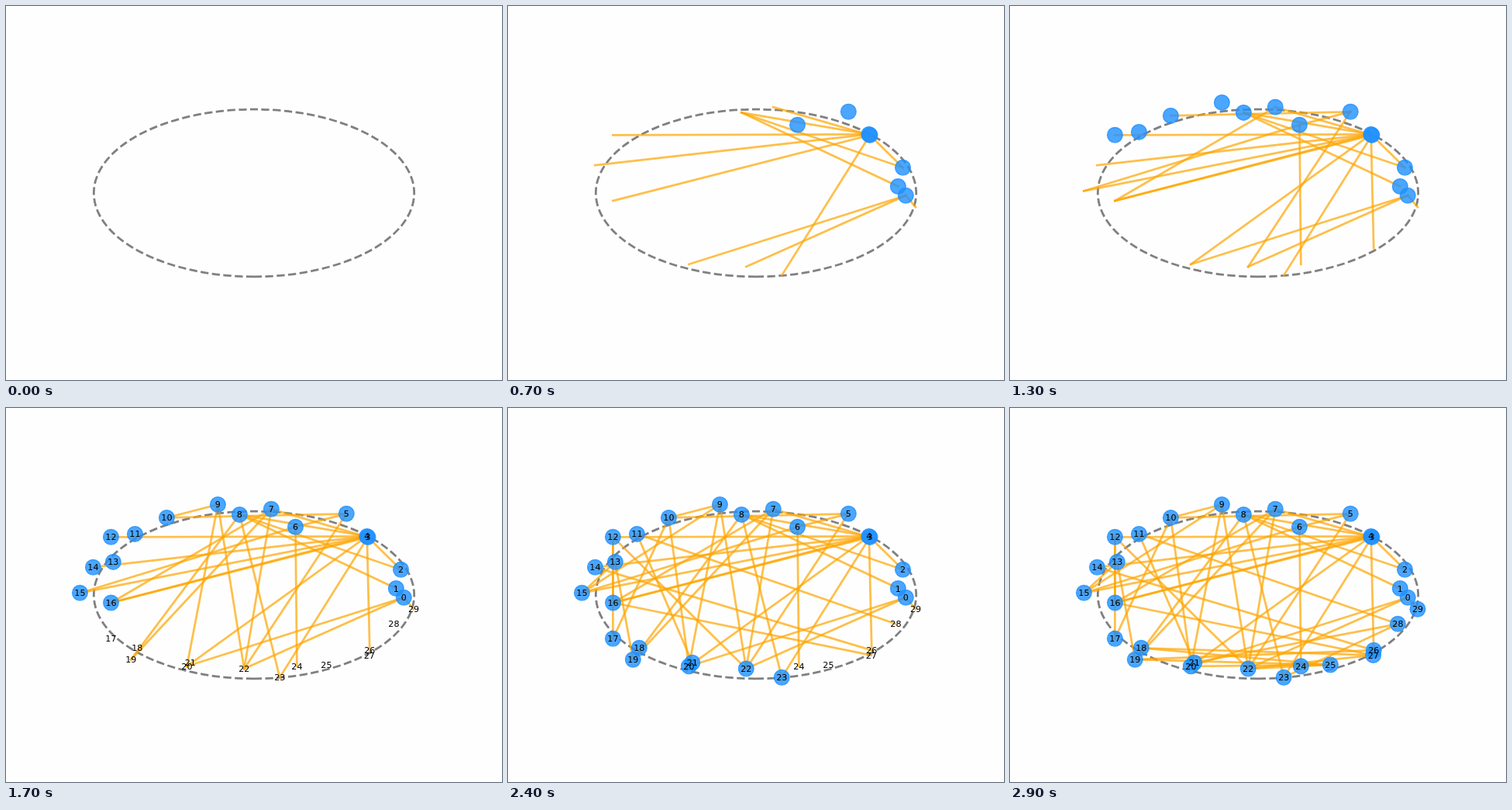
These frames come from a looping animation (640 px wide and 482 px high, 3000 ms). An HTML page with a canvas:

```html
<!DOCTYPE html>
<html lang="en">
<head>
<meta charset="utf-8">
<title>Growing network</title>
<style>
  html, body { margin: 0; width: 100%; height: 100%; overflow: hidden; background: #fefefe; }
  canvas { display: block; }
</style>
</head>
<body>
<canvas id="stage" width="640" height="482"></canvas>
<script>
const ctx = document.getElementById('stage').getContext('2d');
const STEP_MS = 100, STEPS = 30;
const LINE = 2.78;

const nodes = [
  [513.3, 244.2], [503.3, 232.5], [509.5, 208.3], [467, 166.4], [465.8, 165.4],
  [439.3, 136.3], [373.5, 153.3], [342.3, 130.3], [301.4, 137.4], [273.4, 124.4],
  [207.4, 141.4], [166.4, 162.4], [135.4, 166.3], [138.3, 198.4], [112.4, 205.3],
  [95.4, 238.3], [135.5, 251], [135.4, 297.3], [169.3, 309.3], [161.3, 324.2],
  [233.4, 332.8], [237.8, 328.2], [307.3, 336], [353.2, 347.2], [375.4, 332.8],
  [413.4, 331], [469.3, 312.2], [468.7, 318.6], [500.4, 278.3], [526, 259.2]
];

// Neighbours of each node, in drawing order.
const links = [
  [20, 22, 29], [8], [8, 3], [7, 23, 16], [8, 12, 14, 15, 16, 20, 26],
  [22, 6, 10], [15, 24], [16, 19, 22], [19, 23], [10, 20, 22, 15],
  [17, 20], [21, 28], [16, 17, 22], [15, 19], [26],
  [], [27], [], [25, 27], [25, 26],
  [25], [28], [27, 25], [28]
];
const edges = links.flatMap((ends, from) => ends.map(to => [nodes[from], nodes[to]]));

function drawEllipse() {
  ctx.strokeStyle = '#808080';
  ctx.lineWidth = LINE;
  ctx.lineCap = 'butt';
  ctx.setLineDash([3.7 * LINE, 1.6 * LINE]);
  ctx.beginPath();
  ctx.ellipse(320, 241, 206.7, 107.8, 0, Math.PI / 2, -1.5 * Math.PI, true);
  ctx.stroke();
  ctx.setLineDash([]);
}

function drawEdge([a, b]) {
  ctx.beginPath();
  ctx.moveTo(...a);
  ctx.lineTo(...b);
  ctx.stroke();
}

function drawNode([x, y]) {
  ctx.beginPath();
  ctx.arc(x, y, 9.82, 0, 2 * Math.PI);
  ctx.fill();
  ctx.stroke();
}

function draw(step) {
  const shown = count => Math.floor(count * step / (STEPS - 1));

  ctx.fillStyle = '#fefefe';
  ctx.fillRect(0, 0, 640, 482);
  drawEllipse();

  ctx.globalAlpha = 0.7;
  ctx.strokeStyle = '#ffa500';
  ctx.lineCap = 'square';
  edges.slice(0, shown(edges.length)).forEach(drawEdge);

  ctx.globalAlpha = 0.8;
  ctx.fillStyle = ctx.strokeStyle = '#1e90ff';
  ctx.lineWidth = 1.39;
  nodes.slice(0, shown(nodes.length)).forEach(drawNode);

  ctx.globalAlpha = 1;
  if (step < STEPS / 2) return;
  ctx.fillStyle = '#000';
  ctx.font = '11.11px "DejaVu Sans", sans-serif';
  ctx.textAlign = 'center';
  nodes.forEach(([x, y], i) => ctx.fillText(i, x, y + 4));
}

function tick() {
  draw(Math.floor(performance.now() / STEP_MS) % STEPS);
  requestAnimationFrame(tick);
}
tick();
</script>
</body>
</html>
```
